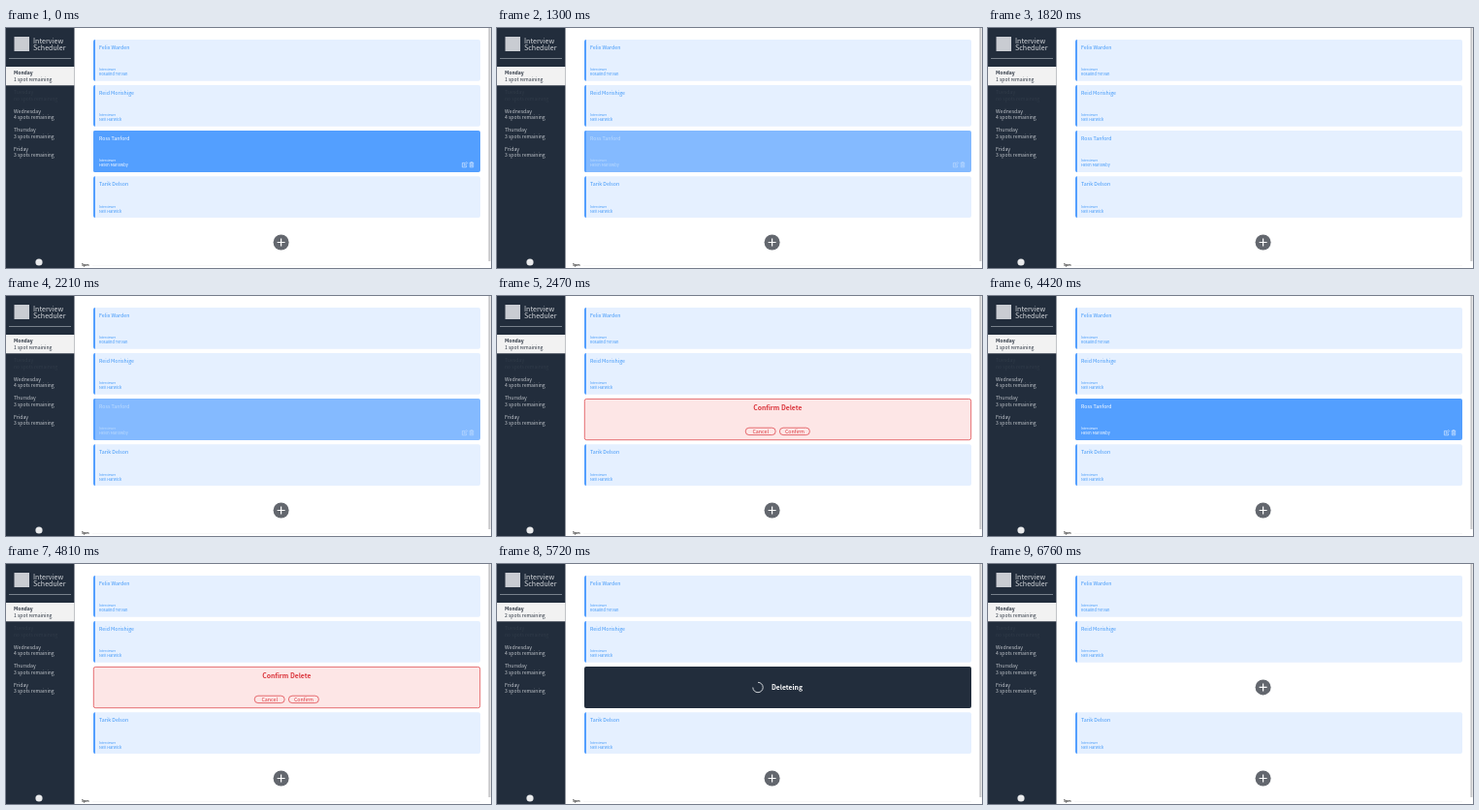
An HTML page that plays this animation: 500x248 px, repeating every 8 s.

```html
<!DOCTYPE html>
<html lang="en">
<head>
<meta charset="utf-8">
<title>Interview Scheduler</title>
<style>
html, body { margin: 0; width: 100%; height: 100%; overflow: hidden; background: #fff; }
svg { display: block; width: 100%; height: 100%; }
text { font-family: "Noto Sans CJK JP", "Noto Sans CJK SC", "Noto Sans CJK", Lato, sans-serif; white-space: pre; }
</style>
</head>
<body>
<svg id="stage" viewBox="0 0 500 248"></svg>
<script>
const LOOP = 8000, STEP = 130;
const NAVY = '#222d3c', BLUE = '#539fff', PALE = '#e5f0ff', RED = '#db353c';
const stage = document.getElementById('stage');

function add(parent, tag, attrs, content) {
  const el = document.createElementNS('http://www.w3.org/2000/svg', tag);
  for (const key in attrs) el.setAttribute(key, attrs[key]);
  if (content) el.textContent = content;
  parent.append(el);
  return el;
}
const group = (parent = stage) => add(parent, 'g', {});
const rect = (parent, x, y, width, height, fill, rx = 0) =>
  add(parent, 'rect', { x, y, width, height, fill, rx });
const text = (parent, x, y, size, fill, content, more = {}) =>
  add(parent, 'text', { x, y, fill, 'font-size': size, ...more }, content);
const show = (el, on) => el.setAttribute('display', on ? 'inline' : 'none');

function mix(a, b, k) {
  const part = (hex, i) => parseInt(hex.slice(1 + 2 * i, 3 + 2 * i), 16);
  return `rgb(${[0, 1, 2].map(i => Math.round(part(a, i) + (part(b, i) - part(a, i)) * k))})`;
}

function sidebar() {
  rect(stage, 0, 0, 70.5, 248, NAVY);
  rect(stage, 8.5, 9, 15.5, 15, '#c9ccd2');
  text(stage, 28, 15.6, 7.1, '#d5d8dc', 'Interview', { 'font-weight': 300 });
  text(stage, 28, 23, 7.1, '#d5d8dc', 'Scheduler', { 'font-weight': 300 });
  rect(stage, 3, 31.2, 64, 0.8, '#8d959f');
  rect(stage, 0, 40, 70.5, 19.3, '#f2f2f2');

  const day = (y, name, spots, fill, more) => {
    text(stage, 8, y, 5.2, fill, name, more);
    return text(stage, 8, y + 6.5, 5.05, fill, spots);
  };
  const monday = day(48.4, 'Monday', '1 spot remaining', '#2b3440', { 'font-weight': 700, 'font-size': 5 });
  day(68, 'Tuesday', 'no spots remaining', '#303b49');
  day(87.5, 'Wednesday', '4 spots remaining', '#c0c5cb');
  day(107, 'Thursday', '3 spots remaining', '#c0c5cb');
  day(126.5, 'Friday', '3 spots remaining', '#c0c5cb');
  add(stage, 'circle', { cx: 34, cy: 242, r: 3.6, fill: '#e9eaec' });
  return monday;
}

function card(y, student, interviewer) {
  const g = group();
  const back = rect(g, 90, y, 399, 42.8, PALE, 2);
  add(g, 'path', { d: `M92 ${y}v42.8a2 2 0 0 1-2-2v-38.8a2 2 0 0 1 2-2z`, fill: BLUE });
  const words = group(g);
  text(words, 96, y + 9.8, 5.27, 'inherit', student);
  text(words, 96, y + 32.3, 3.2, 'inherit', 'Interviewer', { 'font-weight': 300 });
  text(words, 96, y + 37.3, 3.95, 'inherit', interviewer);
  for (const el of words.children) el.removeAttribute('fill');
  words.setAttribute('fill', '#3f97f8');

  const icons = add(g, 'g', {
    transform: `translate(470 ${y + 32.3})`, fill: 'none', stroke: '#e5f0ff', 'stroke-width': 0.6, opacity: 0
  });
  add(icons, 'path', { d: 'M3 1H.4v4.4h4.2V3.4M2 3.8l.3-1.3L4.7.1l1 1-2.4 2.4z' });
  add(icons, 'path', { d: 'M7.8.9h4.4M9.2.9v-.6h1.6v.6M8.3 1v4.4h3.4V1M9.4 2v2.4M10.6 2v2.4' });
  const hover = k => {
    back.setAttribute('fill', mix(PALE, BLUE, k));
    words.setAttribute('fill', mix('#3f97f8', '#ffffff', k));
    icons.setAttribute('opacity', k);
  };
  return { g, hover };
}

function plus(y) {
  const g = group();
  add(g, 'circle', { cx: 283.6, cy: y, r: 8, fill: '#63676e' });
  add(g, 'path', { d: `M279.6 ${y}h8m-4-4v8`, stroke: '#fff', 'stroke-width': 1.2 });
  return g;
}

function button(parent, x, label) {
  const pill = add(parent, 'rect', {
    x, y: 136.2, width: 31, height: 7.4, rx: 3.7, stroke: RED, 'stroke-width': 0.7
  });
  const word = text(parent, x + 15.5, 141.8, 5.3, RED, label, { 'text-anchor': 'middle' });
  return on => {
    pill.setAttribute('fill', on ? RED : '#fde6e6');
    word.setAttribute('fill', on ? '#fff' : RED);
  };
}

const spots = sidebar();
rect(stage, 497.4, 0, 2, 241, '#c6c6c8');
card(12, 'Felix Warden', 'Rosalind Tervan');
card(59, 'Reid Morishige', 'Nell Harwick');
const booked = card(106.1, 'Ross Tanford', 'Helen Marlowby');
card(153.2, 'Tarik Delson', 'Nell Harwick');
plus(221.5);
const empty = plus(127.4);
text(stage, 78, 246.4, 3.5, '#222', '5pm', { 'font-weight': 700 });
rect(stage, 89, 245, 400, 0.3, '#e6e6e6');

const confirm = group();
add(confirm, 'rect', {
  x: 90.3, y: 106.4, width: 398.4, height: 42.3, rx: 2, fill: '#fde6e6', stroke: RED, 'stroke-width': 0.7
});
text(confirm, 289.3, 117.9, 6.8, RED, 'Confirm Delete', { 'font-weight': 700, 'text-anchor': 'middle' });
const cancelHover = button(confirm, 256.2, 'Cancel');
const confirmHover = button(confirm, 291.4, 'Confirm');

const deleting = group();
rect(deleting, 90, 106.1, 399, 42.8, NAVY, 2);
const spinner = add(deleting, 'path', {
  d: 'M0-5.2A5.2 5.2 0 1 1-5.2 0', fill: 'none', stroke: '#dfe2e6', 'stroke-width': 0.9
});
text(deleting, 283, 130.1, 6.8, '#fff', 'Deleteing', { 'font-weight': 700 });

const ramp = (t, from, to) => Math.min(1, Math.max(0, (t - from) / (to - from)));

function hoverAt(t) {
  if (t < 2080) return 1 - ramp(t, 1040, 1820);
  return t < 2470 ? ramp(t, 1950, 2340) : 1;
}

function render(time) {
  const t = Math.floor((time % LOOP) / STEP) * STEP;
  const asking = (t >= 2470 && t < 3380) || (t >= 4810 && t < 5720);
  const busy = t >= 5720 && t < 6500;
  show(confirm, asking);
  show(deleting, busy);
  show(empty, t >= 6500);
  show(booked.g, !asking && t < 5720);
  booked.hover(hoverAt(t));
  cancelHover(t >= 3120 && t < 3380);
  confirmHover(t >= 5330);
  spinner.setAttribute('transform', `translate(269 127.5) rotate(${(t - 5720) * 0.36})`);
  spots.textContent = t < 5720 ? '1 spot remaining' : '2 spots remaining';
}

const start = performance.now();
function tick() {
  render(performance.now() - start);
  requestAnimationFrame(tick);
}
tick();
</script>
</body>
</html>
```
